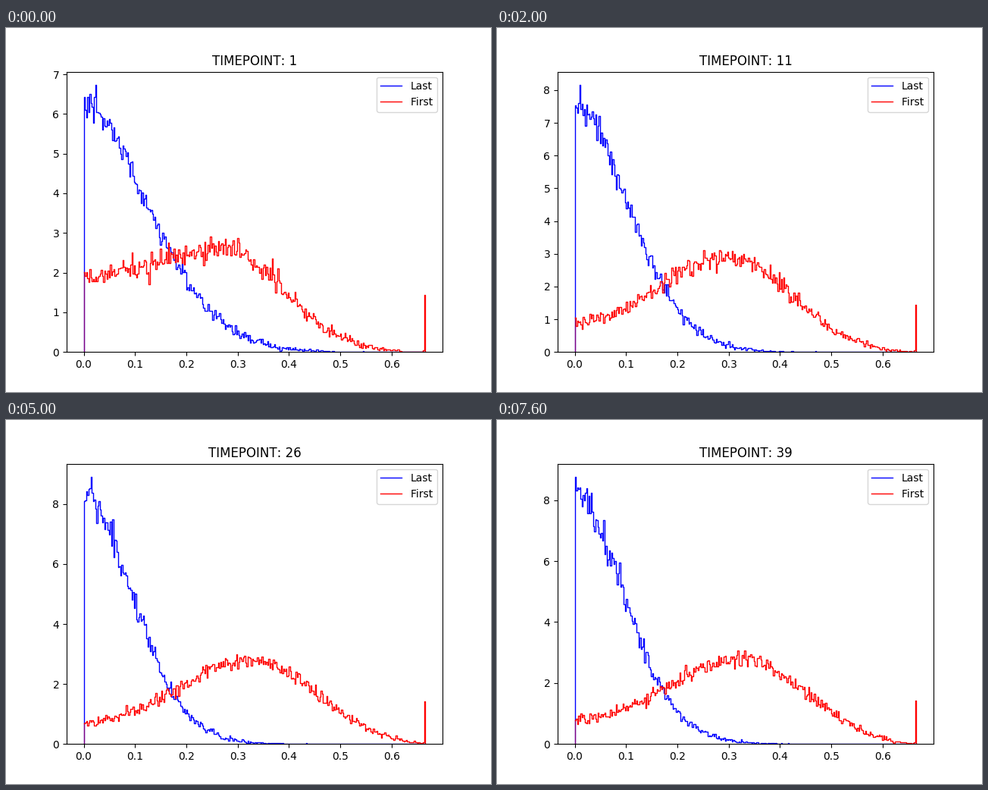
These frames come from a looping animation (640x480 px, 7.8 s). A matplotlib script:

```python
import numpy as np
import matplotlib.pyplot as plt
from matplotlib.animation import FuncAnimation

FRAMES = 39
INTERVAL = 200
BINS = 300
X_MAX = .666
PER_UNIT = 110          # samples in a bin of density 1
SPIKE = 1.43            # constant density of the last bin
DECAY = 1.8             # exponent of the falling curve
DECAY_AREA = .889       # gamma(1 + 1 / DECAY)

# Key poses: tallest bin, crest of the red bump, and its relative left floor
TIMES = [1, 7, 16, 22, 29, 33, 39]
PEAK = [6.73, 8.17, 8.134, 9.786, 8.241, 12.38, 8.76]
CREST = [.27, .3, .29, .32, .325, .57, .32]
FLOOR = [.717, .226, .29, .168, .26, .03, .255]

plt.rcParams["text.kerning_factor"] = 6

edges = np.linspace(0, X_MAX, BINS + 1)
mids = (edges[:-1] + edges[1:]) / 2


def falling(height):
    """Stretched exponential with unit area."""
    scale = 1 / (height * DECAY_AREA)
    return height * np.exp(-(mids / scale) ** DECAY)


def bump(crest, floor):
    """Bell on a left-hand floor, cut off at X_MAX, with unit area."""
    width = .064 + .2 * crest
    bell = np.exp(-.5 * ((mids - crest) / width) ** 2)
    shape = bell + floor * (1 - bell) * (mids < crest)
    shape *= 1 - (mids / X_MAX) ** 16
    return shape / (shape.mean() * X_MAX)


def sample(rng, density):
    return rng.poisson(density * PER_UNIT) / PER_UNIT


def histograms(t):
    rng = np.random.default_rng(1000 + t)
    peak, crest, floor = (np.interp(t, TIMES, v) for v in (PEAK, CREST, FLOOR))
    last = np.minimum(sample(rng, falling(.945 * peak)), peak)
    last[last.argmax()] = peak
    first = sample(rng, bump(crest, floor))
    first[-2:] = .05, SPIKE
    return last, first, peak


def outline(heights):
    return np.repeat(edges, 2), np.concatenate([[0], np.repeat(heights, 2), [0]])


fig, ax = plt.subplots(figsize=(6.4, 4.8), dpi=100)
last_line, = ax.plot([], [], color="blue", lw=1, label="Last", zorder=1)
first_line, = ax.plot([], [], color="red", lw=1, label="First", zorder=1)
first_edge, = ax.plot([], [], color="red", lw=1, alpha=.5, zorder=1)
ax.set_xlim(-.05 * X_MAX, 1.05 * X_MAX)
ax.legend(loc="upper right")
title = ax.set_title("")


def update(i):
    t = i + 1
    last, first, peak = histograms(t)
    last_line.set_data(*outline(last))
    x, y = outline(first)
    first_line.set_data(x[1:], y[1:])
    first_edge.set_data(x[:2], y[:2])
    ax.set_ylim(0, 1.05 * peak)
    title.set_text(f"TIMEPOINT: {t}")
    return last_line, first_line, first_edge, title


anim = FuncAnimation(fig, update, frames=FRAMES, interval=INTERVAL,
                     init_func=lambda: update(0), repeat=True, repeat_delay=0)
plt.show()
```
